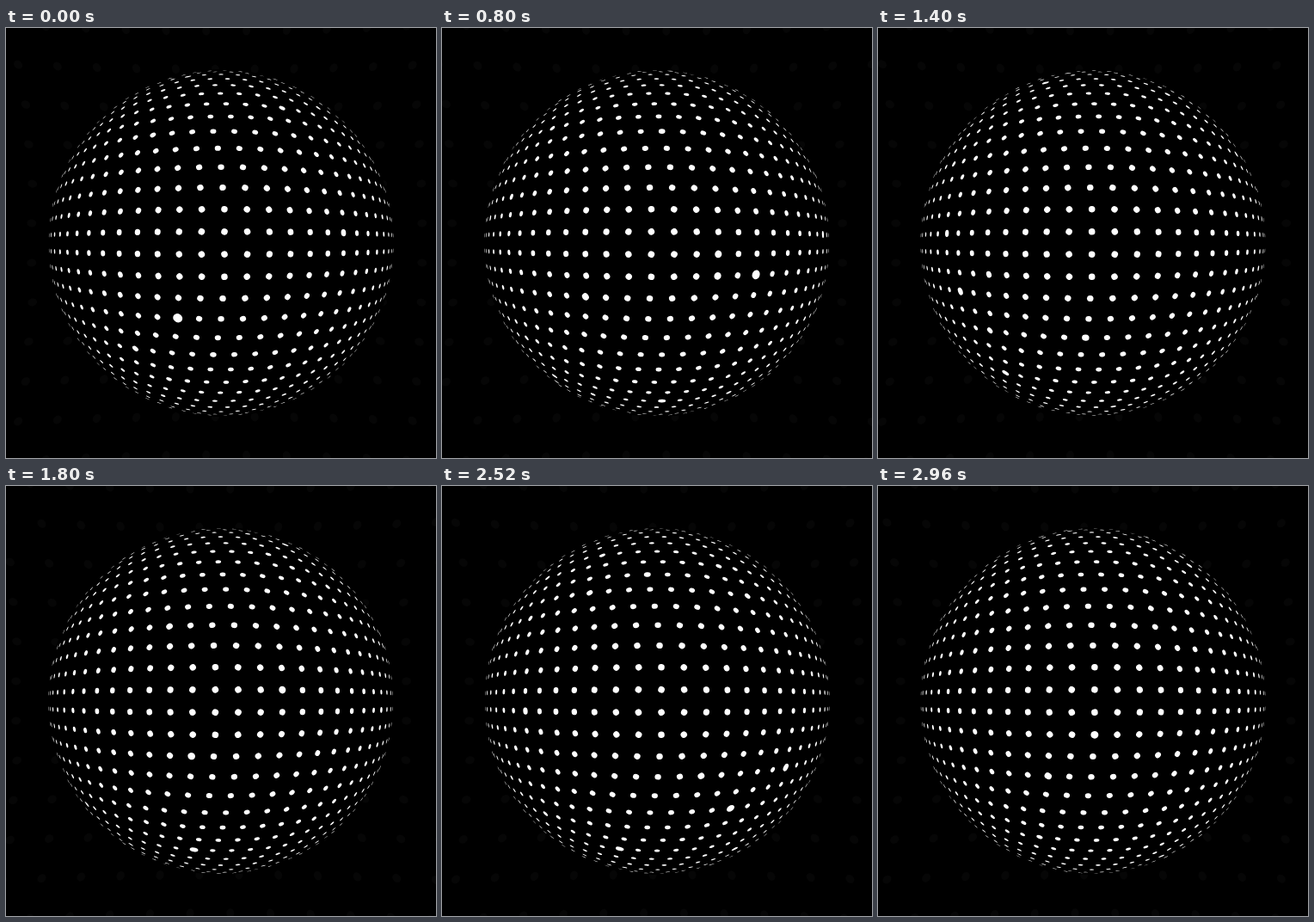
An HTML page with a canvas that plays this animation: 500 px wide and 500 px high, repeating every 3000 ms.

```html
<!DOCTYPE html>
<html lang="en">
<head>
<meta charset="utf-8">
<title>Dotted sphere</title>
<style>
  html, body { margin: 0; width: 100%; height: 100%; overflow: hidden; background: #000; }
  canvas { display: block; width: 500px; height: 500px; }
</style>
</head>
<body>
<canvas id="stage" width="500" height="500"></canvas>
<script>
const ctx = document.getElementById('stage').getContext('2d');
const TAU = Math.PI * 2;
const LOOP = 3000, TICK = 40;
const SPEED = 2;                    // dot steps per second, in every row
const SHIFT = SPEED * LOOP / 1000;  // dot steps per loop
const RADIUS = 200.5;               // outline of the sphere on the stage
const DIST = 1.95;                  // camera distance in sphere radii
const FOCAL = RADIUS * Math.sqrt(DIST * DIST - 1);
const ROWS = 42;
const FIRST = 0.0741;               // longitude of each row's first dot, in turns
const DOT = 0.0108;
const FLARE_MS = 60, FLARES_PER_TICK = 30;

// Rows hold fewer dots towards the poles, so the spacing stays even.
const rows = Array.from({ length: ROWS }, (_, r) => {
  const lat = (r + 0.5 - ROWS / 2) * Math.PI / ROWS;
  return { lat, n: Math.floor(2 * ROWS * Math.cos(lat)) };
});

const mod = (a, n) => ((a % n) + n) % n;

let seed = 7;
function random() {
  seed = (seed * 16807) % 2147483647;
  return seed / 2147483647;
}

// Random dots swell briefly; a few of them strongly.
const flares = [];
for (let ms = 0; ms < LOOP; ms += TICK) {
  for (let i = 0; i < FLARES_PER_TICK; i++) {
    const r = Math.floor(random() * ROWS);
    const j = Math.floor(random() * rows[r].n);
    flares.push({ ms, r, j, power: 0.2 + 0.4 * random() });
  }
}

const dotKey = (r, j) => r * 1000 + j;

function flareMap(ms) {
  const map = new Map();
  for (const f of flares) {
    const cycle = Math.round((ms - f.ms) / LOOP);
    const gap = Math.abs(ms - f.ms - cycle * LOOP);
    if (gap >= FLARE_MS) continue;
    const key = dotKey(f.r, mod(f.j - SHIFT * cycle, rows[f.r].n));
    const boost = f.power * (1 - gap / FLARE_MS);
    map.set(key, Math.max(boost, map.get(key) || 0));
  }
  return map;
}

function spot(x, y, rx, ry) {
  ctx.beginPath();
  ctx.ellipse(250 + x, 250 + y, rx, ry, Math.atan2(y, x), 0, TAU);
  ctx.fill();
}

function drawSphere(ms) {
  const boosts = flareMap(ms);
  ctx.fillStyle = '#fff';
  rows.forEach(({ lat, n }, r) => {
    for (let j = 0; j < n; j++) {
      const lon = TAU * (FIRST + (j + SPEED * ms / 1000) / n);
      const z = Math.cos(lat) * Math.cos(lon);
      if (z <= 1 / DIST) continue;
      const scale = FOCAL / (DIST - z);
      const squash = Math.max((DIST * z - 1) / (DIST - z), 0.08);
      const size = DOT * scale * (1 + (boosts.get(dotKey(r, j)) || 0));
      spot(Math.cos(lat) * Math.sin(lon) * scale, Math.sin(lat) * scale, size * squash, size);
    }
  });
}

// Barely visible inner wall of a larger shell behind the sphere.
function drawShell(ms) {
  ctx.fillStyle = '#060606';
  for (const { lat, n } of rows) {
    const phase = mod(FIRST * n + SPEED * ms / 1000, 1);
    for (let j = -10; j <= 10; j++) {
      const lon = TAU * (j + phase) / n;
      const scale = 1800 / (2 + Math.cos(lat) * Math.cos(lon));
      spot(Math.cos(lat) * Math.sin(lon) * scale, Math.sin(lat) * scale, 5.5, 4.5);
    }
  }
}

function draw(ms) {
  ctx.fillStyle = '#000';
  ctx.fillRect(0, 0, 500, 500);
  drawShell(ms);
  ctx.fillStyle = '#000';
  spot(0, 0, RADIUS + 1.5, RADIUS + 1.5);
  drawSphere(ms);
}

const start = performance.now();
function frame() {
  const ms = (performance.now() - start) % LOOP;
  draw(Math.floor(ms / TICK) * TICK);
  requestAnimationFrame(frame);
}
frame();
</script>
</body>
</html>
```
